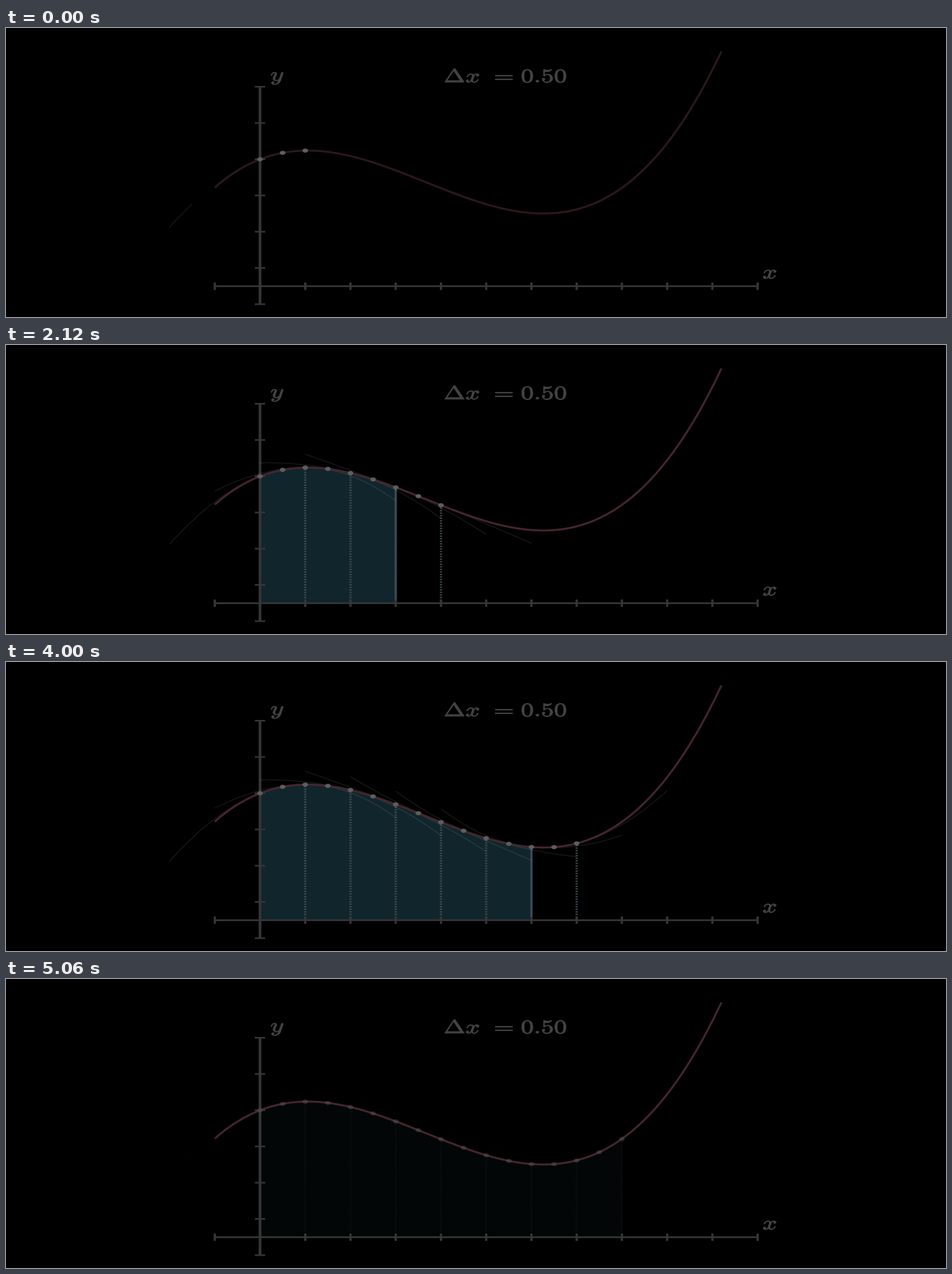
A matplotlib script for the animation above (5.15 s loop, 1280 px wide and 394 px high).

```python
import numpy as np
import matplotlib.pyplot as plt
from matplotlib.animation import FuncAnimation
from matplotlib.patches import Ellipse, PathPatch, Polygon
from matplotlib.textpath import TextPath
from matplotlib.transforms import Affine2D

W, H, LOOP, INTERVAL = 1280, 394, 5150, 25
UNIT_X, UNIT_Y, ORIGIN_X, BASE_Y = 61.6, 49.4, 345.9, 352
ASPECT = 1.36  # the whole scene is drawn wider than tall
PX = 0.72      # one pixel in points
AXIS, LABEL, CURVE, AREA = "#363636", "#444444", "#46262e", "#11252c"

# The film advances in uneven steps of about 120 ms.
STEP_TIMES = [0, 480, 580, 1180, 1760, 2450, 3060, 3270, 3640, 4330, 5060, 5180]
STEP_COUNTS = [0, 4, 5, 10, 15, 21, 26, 28, 31, 37, 43, 44]
STAGE_START = [0, 5, 10, 15, 21, 26, 31, 37]
STAGE_END = [3, 9, 14, 19, 25, 30, 35, 41]
FADE_STEP = 43

plt.rcParams["mathtext.fontset"] = "cm"
fig = plt.figure(figsize=(W / 100, H / 100), dpi=100, facecolor="black")
ax = fig.add_axes([0, 0, 1, 1])
ax.set_xlim(0, W)
ax.set_ylim(H, 0)
ax.axis("off")


def to_x(x):
    return ORIGIN_X + UNIT_X * np.asarray(x, dtype=float)


def curve_y(x):
    x = np.asarray(x, dtype=float)
    return 179 - (23.98 * x - 13.31 * x**2 + 1.213 * x**3)


def parabola_y(x, i):
    """Quadratic through the curve at i, i + 0.5 and i + 1."""
    return curve_y(x) + 1.213 * (x - i) * (x - i - 0.5) * (x - i - 1)


def line(xs, ys, color, width, z, **kw):
    return ax.plot(xs, ys, color=color, lw=width * PX, zorder=z, snap=False,
                   solid_capstyle="butt", dash_capstyle="butt", **kw)[0]


def label(text, x, y, size=26):
    place = Affine2D().scale(ASPECT, -1).translate(x, y)
    path = place.transform_path(TextPath((0, 0), text, size=size))
    ax.add_patch(PathPatch(path, fc=LABEL, ec=LABEL, lw=0.8 * PX, zorder=5))


def part(u, start, length):
    return float(np.clip((u - start) / length, 0, 1))


# Axes and labels
line(to_x([-1, 11]), [BASE_Y, BASE_Y], AXIS, 2.4, 3)
line([ORIGIN_X] * 2, [80, 376.5], AXIS, 3.6, 3)
for tick in range(-1, 12):
    line(to_x([tick, tick]), [BASE_Y - 5, BASE_Y + 5], AXIS, 3, 3)
for k in range(7):
    y = 376.5 - k * UNIT_Y
    line([ORIGIN_X - 7, ORIGIN_X + 7], [y, y], AXIS, 2.2, 3)
label(r"$\Delta x$", 596, 74)
label("$=$", 658, 74)
label("$0.50$", 701, 74)
label("$x$", 1030, 341.5)
label("$y$", 360, 72)

# Curve, area and the parts of each stage
domain = np.linspace(-1, 10.2, 300)
curve = line(to_x(domain), curve_y(domain), CURVE, 2.7, 4)
area = ax.add_patch(Polygon([[0, 0], [0, 0], [0, 0]], fc=AREA, ec="none", zorder=1))
edge = line([], [], "#3a4a52", 3, 2.5)
n_stages = len(STAGE_START)
parabolas = [line([], [], "white", 1.3, 3.9) for _ in range(n_stages)]
drops = [line([], [], "#404c52", 3, 2, linestyle=(0, (0.58, 0.58)))
         for _ in range(n_stages)]
dots = [ax.add_patch(Ellipse((to_x(k / 2), curve_y(k / 2)), 5.6 * ASPECT, 5.6,
                             fc="#5e5e5e", ec="none", zorder=6))
        for k in range(2 * n_stages + 1)]


def draw(i):
    t = (i + 1) * INTERVAL - 1
    step = int(np.interp(t, STEP_TIMES, STEP_COUNTS) + 1e-6)
    fading = step >= FADE_STEP
    curve.set_alpha(min(1, 0.65 + 0.1 * step))
    edge.set_visible(False)
    reach = 0.0
    for n, (start, end) in enumerate(zip(STAGE_START, STAGE_END)):
        u = (step - start) / (end - start)
        begun = u >= 0

        grown = min(1, 0.1 + 1.75 * u) if begun else 0
        xs = np.linspace(n - 2, n - 2 + 5 * grown, 80)
        parabolas[n].set_data(to_x(xs), parabola_y(xs, n))
        parabolas[n].set_alpha(0.01 if fading else 0.095)
        parabolas[n].set_visible(begun)

        top = BASE_Y + (curve_y(n + 1) - BASE_Y) * part(u, 0.2, 0.4)
        drops[n].set_data(to_x([n + 1, n + 1]), [BASE_Y, top])
        drops[n].set_alpha(0.12 if fading else 1)
        drops[n].set_visible(top < BASE_Y)

        reach += part(u, 0.75, 0.25)
        if 0.75 <= u < 1:
            edge.set_data([to_x(reach)] * 2, [curve_y(reach), BASE_Y])
            edge.set_visible(True)

        for dot in dots[2 * n + (n > 0):2 * n + 3]:
            dot.set_visible(begun)
            dot.set_alpha(0.4 if fading else 1)

    xs = np.linspace(0, reach, 160)
    outline = np.column_stack([to_x(xs), curve_y(xs)])
    area.set_xy(np.vstack([outline, [to_x(reach), BASE_Y], [ORIGIN_X, BASE_Y]]))
    area.set_alpha(0.17 if fading else 1)
    area.set_visible(reach > 0)
    return []


anim = FuncAnimation(fig, draw, frames=LOOP // INTERVAL, interval=INTERVAL,
                     repeat=True, repeat_delay=0, blit=False)
plt.show()
```
